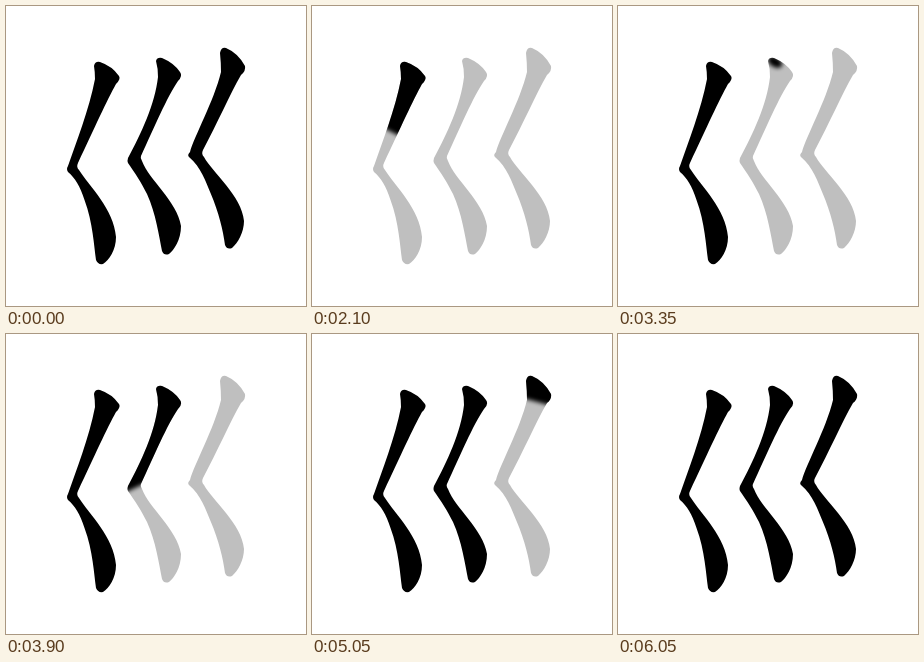
An HTML page for the animation above (7.05 s loop, 300x300 px).

```html
<!DOCTYPE html>
<html lang="en">
<head>
<meta charset="utf-8">
<title>Three brush strokes</title>
<style>
  html, body { margin: 0; height: 100%; overflow: hidden; background: #fff; }
  svg { display: block; width: 100%; height: 100%; }
</style>
</head>
<body>
<svg id="stage" viewBox="0 0 300 300">
  <filter id="soft" filterUnits="userSpaceOnUse" x="-50" y="-50" width="400" height="400">
    <feGaussianBlur stdDeviation="2"/>
  </filter>
</svg>
<script>
const LOOP = 7050, FADE = 1000, START = 1750, GAP = 1600;
const STEP_TIMES = [0, 100, 250, 350, 450, 550, 700, 800, 900, 1000, 1100];

// Ink front per step, relative to the stroke's bend: x, y, tilt in degrees
const FRONTS = [
  null,
  [38, -82, 15], [29, -59, 27], [19.5, -35, 27], [10, -16, 25], [6, 0, -25],
  [14, 19, -30], [27, 38, -25], [35, 56, -12], [36, 76, 5],
];

const STROKES = [
  { bend: [62, 162], dot: [95, 61],
    d: `M88 60 Q89 55 94 56 Q106 60 113 70 Q115 73 110 78 C101 94 89 121 72 157
        Q70 161 73 164 C83 180 108 203 110 231 C110 244 103 254 97 258 Q92 259 90 254
        C88 240 87 217 78.5 194 C74 180 69 172 62 166 Q60 163 62 160
        C70 137 83 104 89 73 Q89 66 88 60Z` },
  { bend: [123, 154], dot: [157, 56],
    d: `M150 55 Q151 51 156 52 Q168 57 174 66 Q177 70 172 75 C161 91 148 122 135 150
        Q134 152 136 155 C143 174 171 195 175 220 C175 234 168 244 163 248 Q158 250 156 245
        C153 230 150 208 141 188 C135 176 129 167 122 157 Q121 155 122 152
        C135 128 149 98 152 71 Q152 62 150 55Z` },
  { bend: [184, 149], dot: [221, 47],
    d: `M214 47 Q215 41 220 42 Q232 47 239 60 Q240 65 235 69 C224 88 211 118 197 144
        Q195 148 198 151 C206 166 236 190 238 215 C238 226 232 237 226 242 Q221 244 219 239
        C217 224 213 207 204.5 187 C200 176 195 161 183 151 Q181 149 184 146
        C188 131 208 95 215 66 Q215 57 214 47Z` },
];

const stage = document.getElementById('stage');

function add(parent, tag, attrs) {
  const el = document.createElementNS('http://www.w3.org/2000/svg', tag);
  for (const key in attrs) el.setAttribute(key, attrs[key]);
  return parent.appendChild(el);
}

STROKES.forEach((stroke, i) => {
  const clip = add(stage, 'clipPath', { id: 'clip' + i });
  add(clip, 'path', { d: stroke.d });
  stroke.shape = add(stage, 'path', { d: stroke.d });
  const clipped = add(stage, 'g', { 'clip-path': `url(#clip${i})` });
  stroke.ink = add(clipped, 'g', { filter: 'url(#soft)' });
  const [x, y] = stroke.dot;
  add(stroke.ink, 'ellipse', { rx: 8, ry: 5, transform: `translate(${x} ${y}) rotate(30)` });
  stroke.wash = add(stroke.ink, 'rect', { x: -150, y: -250, width: 300, height: 250 });
});

function drawStroke(stroke, index, t) {
  const elapsed = t - START - GAP * index;
  const step = STEP_TIMES.filter(s => s <= elapsed).length - 1;
  const full = t < FADE || step >= FRONTS.length;
  const front = FRONTS[step];
  stroke.shape.setAttribute('fill', full ? '#000' : '#bfbfbf');
  stroke.ink.style.display = full || step < 0 ? 'none' : '';
  stroke.wash.style.display = front ? '' : 'none';
  if (front) {
    const [x, y, tilt] = front;
    const [bx, by] = stroke.bend;
    stroke.wash.setAttribute('transform', `translate(${bx + x} ${by + y}) rotate(${tilt})`);
  }
}

function render() {
  const t = performance.now() % LOOP;
  STROKES.forEach((stroke, i) => drawStroke(stroke, i, t));
  requestAnimationFrame(render);
}
render();
</script>
</body>
</html>
```
